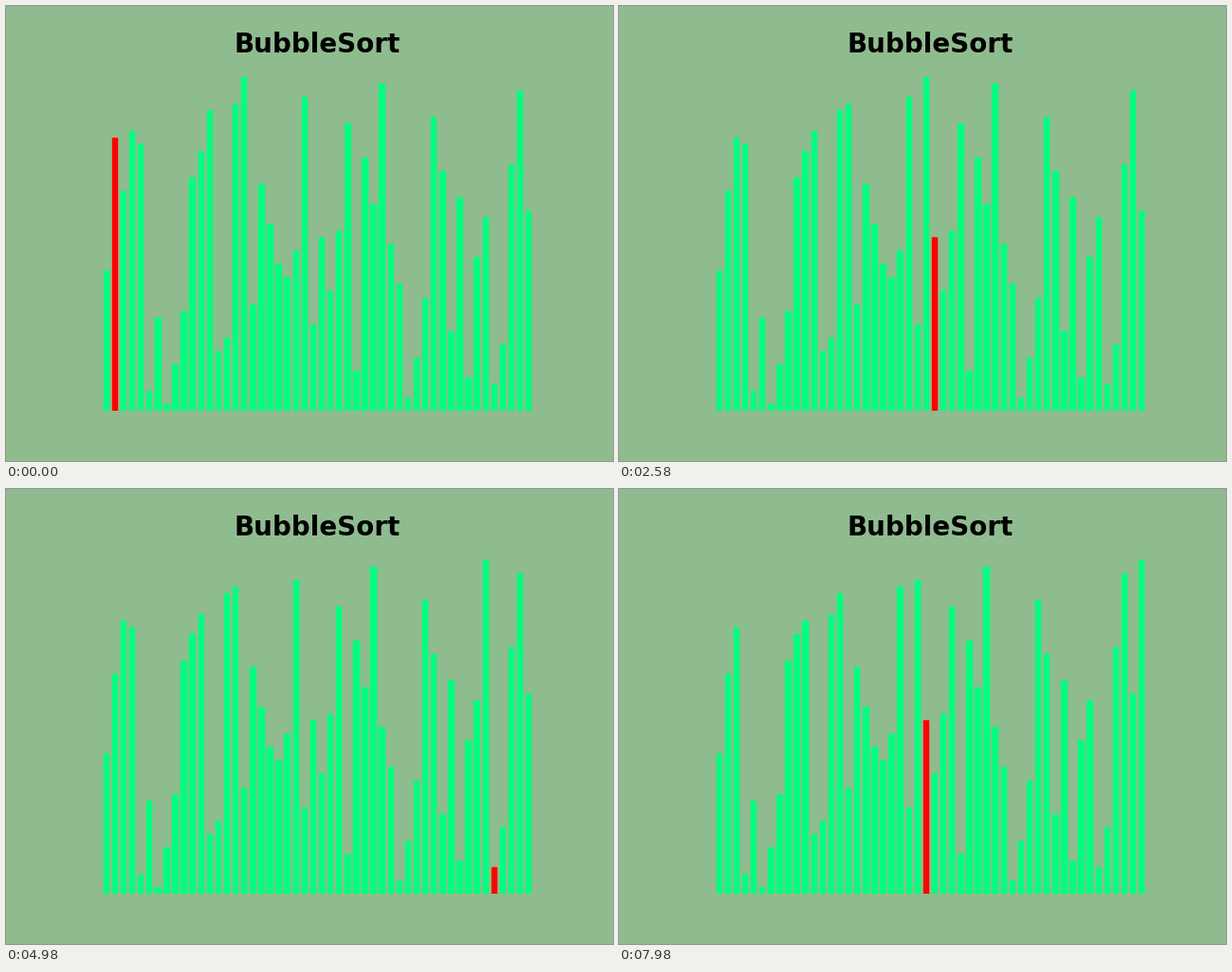
Write a matplotlib script that moves like this. It is 640 by 480 pixels and loops after 8000 ms.

```python
from itertools import islice

import matplotlib.pyplot as plt
from matplotlib.animation import FuncAnimation

BACK, BAR, ACTIVE = "darkseagreen", "springgreen", "red"
LOOP_MS, TICK_MS, STEP_MS = 8000, 20, 60

# The input to sort: 1 to 50 in mixed order. All later states are computed.
START = [
    21, 41, 33, 42, 40, 3, 14, 1, 7, 15,
    35, 39, 45, 9, 11, 46, 50, 16, 34, 28,
    22, 20, 24, 47, 13, 26, 18, 27, 43, 6,
    38, 31, 49, 25, 19, 2, 8, 17, 44, 36,
    12, 32, 5, 23, 29, 4, 10, 37, 48, 30,
]


def bubble_steps(values):
    """Yield (heights, highlighted index) for each stage of the sort."""
    a, n = list(values), len(values)
    yield a[:], 1
    for done in range(n - 1):
        for j in range(n - 1 - done):
            if a[j] > a[j + 1]:
                a[j], a[j + 1] = a[j + 1], a[j]
                yield a[:], j + 1
            yield a[:], (j + 2) % n


step_count = -(-LOOP_MS // STEP_MS)  # rounded up: the last step is cut short
steps = list(islice(bubble_steps(START), step_count))

fig, ax = plt.subplots(figsize=(6.4, 4.8), dpi=100, facecolor=BACK)
bars = ax.bar(range(len(START)), START, width=0.6, color=BAR, edgecolor=BAR,
              linewidth=1)
ax.set_title("BubbleSort", fontsize=20, fontweight="bold", color="black")
ax.axis("off")


def draw(frame):
    heights, active = steps[frame * TICK_MS // STEP_MS]
    for i, (bar, height) in enumerate(zip(bars, heights)):
        bar.set_height(height)
        bar.set_color(ACTIVE if i == active else BAR)
    return bars.patches


anim = FuncAnimation(fig, draw, frames=LOOP_MS // TICK_MS, interval=TICK_MS,
                     init_func=lambda: draw(0), repeat=True, repeat_delay=0)
plt.show()
```
